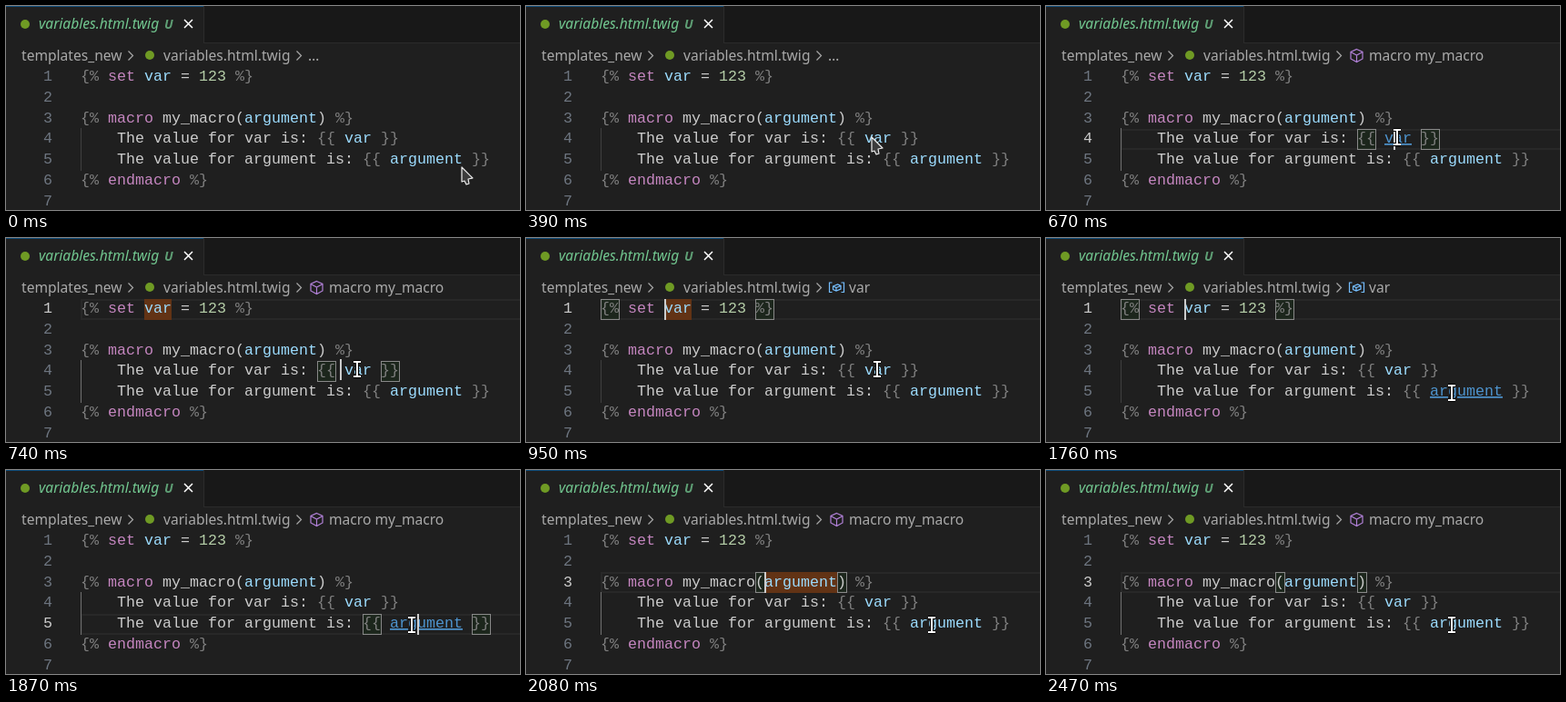
Animation, 565 px wide and 224 px high, one loop 2550 ms. Source, as an HTML page:

```html
<!DOCTYPE html>
<html lang="en">
<head>
<meta charset="utf-8">
<title>Go to definition</title>
<style>
  html, body { margin: 0; width: 100%; height: 100%; overflow: hidden; background: #1f1f1f; }
  svg { display: block; }
  text { white-space: pre; }
  .ui { font: 15.6px "Noto Sans", sans-serif; fill: #a9a9a9; }
  .tab { font-style: italic; fill: #73c991; }
  .code { font: 16.667px "Liberation Mono", monospace; }
  .link { fill: #4e94ce; text-decoration: underline; }
  .line { fill: none; stroke-width: 1.2; }
</style>
</head>
<body>
<svg id="stage" width="565" height="224" viewBox="0 0 565 224">
  <path fill="#181818" d="M217 0H565V41H217Z"/>
  <path class="line" stroke="#2b2b2b" d="M217.5 0V40.5H565"/>
  <path fill="#0078d4" opacity=".5" d="M0 0H217V1H0Z"/>
  <g fill="#6f9a24"><circle cx="21" cy="20" r="5"/><circle cx="158" cy="54" r="5"/></g>
  <g class="ui">
    <text class="tab" x="36" y="25">variables.html.twig</text>
    <text class="tab" x="174" y="25" style="font-size:14px;font-weight:600" opacity=".75">U</text>
    <text x="17" y="60">templates_new</text>
    <text x="173" y="60">variables.html.twig</text>
  </g>
  <path class="line" stroke="#fff" d="M196 15l9 9m0-9l-9 9" style="stroke-width:1.5"/>
  <path class="line" stroke="#a9a9a9" d="M134.500 49.500l5 5-5 5M319.500 49.500l5 5-5 5"/>
  <text class="ui" id="more" x="332" y="60">…</text>
  <g id="macro">
    <path class="line" stroke="#b180d7" d="M341.500 47.500l6.500 3v7.500l-6.500 3.500-6.500-3.500v-7.500zM335 50.500l6.500 3.500 6.500-3.500M341.500 54v7.500"/>
    <text class="ui" x="355" y="60">macro my_macro</text>
  </g>
  <g id="variable">
    <path class="line" stroke="#75beff" d="M336.500 49h-3v10.500h3M346.500 49h3v10.500h-3M337.500 53l5-2 3.500 1.500v3.500l-5 2-3.500-1.500zM337.500 53l3.500 1.500 5-2M341 54.500v3.500"/>
    <text class="ui" x="355" y="60">var</text>
  </g>
  <rect id="current" x="83" width="490" height="21" fill="none" stroke="#282828" stroke-width="2"/>
  <rect id="flash" height="23" fill="#623315"/>
  <path id="guide" d="M82.500 134V181"/>
  <g fill="#006400" fill-opacity=".1" stroke="#888"><rect id="open" height="22"/><rect id="close" height="22"/></g>
  <g class="code" id="code"></g>
  <rect id="caret" width="2" height="23" fill="#ccc"/>
  <path id="arrow" fill="#3c3c3c" stroke="#eee" stroke-width="1.2" stroke-linejoin="round" d="M0 0V16L3 15 5 19 8 18 7 13 12 12Z"/>
  <g id="beam" fill="none">
    <path stroke="#000" stroke-width="4" d="M-4-8H4M0-8V8M-4 8H4"/>
    <path stroke="#fff" stroke-width="2" d="M-4-8H4M0-8V8M-4 8H4"/>
  </g>
</svg>
<script>
const LOOP = 2550;
const $ = id => document.getElementById(id);
const set = (id, attrs) => { for (const k in attrs) $(id).setAttribute(k, attrs[k]); };
const show = (id, on) => { $(id).style.display = on ? '' : 'none'; };
const colX = col => 82 + col * 10;
const rowY = row => 66.5 + row * 22.8;

const GREY = '#808080', PLAIN = '#ccc', KEY = '#c586c0', NAME = '#9cdcfe';

function put(row, x, text, fill, id) {
  const el = document.createElementNS('http://www.w3.org/2000/svg', 'text');
  el.textContent = text;
  el.setAttribute('x', x);
  el.setAttribute('y', Math.round(82 + row * 22.8));
  el.setAttribute('fill', fill);
  if (id) el.id = id;
  $('code').append(el);
}

// Each line: [column, text, colour, id]
[
  [[0, '{%', GREY], [3, 'set', KEY], [7, 'var', NAME], [11, '=', PLAIN], [13, '123', '#b5cea8'], [17, '%}', GREY]],
  [],
  [[0, '{%', GREY], [3, 'macro', KEY], [9, 'my_macro(', PLAIN], [18, 'argument', NAME], [26, ')', PLAIN], [28, '%}', GREY]],
  [[4, 'The value for var is:', PLAIN], [26, '{{', GREY], [29, 'var', NAME, 'useVar'], [33, '}}', GREY]],
  [[4, 'The value for argument is:', PLAIN], [31, '{{', GREY], [34, 'argument', NAME, 'useArg'], [43, '}}', GREY]],
  [[0, '{%', GREY], [3, 'endmacro', KEY], [12, '%}', GREY]],
  []
].forEach((tokens, row) => {
  put(row, 41, row + 1, '#6e7681', 'num' + row);
  for (const [col, ...rest] of tokens) put(row, colX(col), ...rest);
});

// Timed states: [start, ...values]
const crumbs = [[0, 'more'], [580, 'macro'], [780, 'variable'], [1820, 'macro']];
const lines = [[0, -1], [580, 3], [740, 0], [1820, 4], [1930, 2]];
const flashes = [[0], [740, 0, 7, 3], [1120], [1930, 2, 18, 8], [2310]];
const brackets = [[0], [580, 3, 26, 33, 2], [780, 0, 0, 17, 2], [1820, 4, 31, 43, 2], [1970, 2, 17, 26, 1]];
const links = [[0], [530, 'useVar'], [740], [1620, 'useArg'], [1930]];
const carets = [
  [0], [530, 532, 4], [580, 430, 3.3], [630, 382, 3], [740, 367, 2.93], [780, 190, .17], [830, 152, 0],
  [1290], [1760, 152, 0], [1820, 400, 3.4], [1870, 452, 4], [1930, 300, 2.4], [1970, 262, 2], [2470]
];
const beamPath = [[530, 386, 144], [1290, 386, 144], [1400, 401, 146], [1480, 401, 146], [1760, 446, 170], [LOOP, 446, 170]];

const at = (keys, t) => keys.findLast(k => k[0] <= t).slice(1);

function mix(keys, t) {
  const i = keys.findIndex(k => k[0] > t), a = keys[i - 1], b = keys[i];
  const p = (t - a[0]) / (b[0] - a[0]);
  return [1, 2].map(n => a[n] + (b[n] - a[n]) * p);
}

function box(id, row, col, width, inset) {
  set(id, { x: colX(col) + inset, y: Math.round(rowY(row)) + inset, width: width * 10 });
}

function draw(t) {
  const [crumb] = at(crumbs, t);
  for (const id of ['more', 'macro', 'variable']) show(id, id === crumb);
  set('guide', { stroke: crumb === 'macro' ? '#707070' : '#404040' });

  const [line] = at(lines, t);
  for (let i = 0; i < 7; i++) set('num' + i, { fill: i === line ? '#ccc' : '#6e7681' });
  show('current', line >= 0);
  set('current', { y: Math.round(rowY(line)) + 1 });

  const flash = at(flashes, t);
  show('flash', flash.length);
  if (flash.length) box('flash', ...flash, 0);

  const [row, left, right, width] = at(brackets, t);
  for (const [id, col] of [['open', left], ['close', right]]) {
    show(id, width);
    if (width) box(id, row, col, width, .5);
  }

  const [link] = at(links, t);
  for (const id of ['useVar', 'useArg']) $(id).classList.toggle('link', id === link);

  const [x, caretRow] = at(carets, t);
  show('caret', x);
  if (x) set('caret', { x, y: Math.round(rowY(caretRow)) });

  const beam = t >= 530;
  show('beam', beam);
  show('arrow', !beam);
  if (beam) {
    set('beam', { transform: `translate(${mix(beamPath, t).map(Math.round)})` });
  } else {
    // The pointer travels in four even hops
    const p = Math.max(0, Math.min(4, Math.floor((t - 100) / 96.6) + 1)) / 4;
    set('arrow', { transform: `translate(${501 - 121 * p},${177 - 33 * p})` });
  }
}

const start = performance.now();
function tick() {
  draw((performance.now() - start) % LOOP);
  requestAnimationFrame(tick);
}
tick();
</script>
</body>
</html>
```
